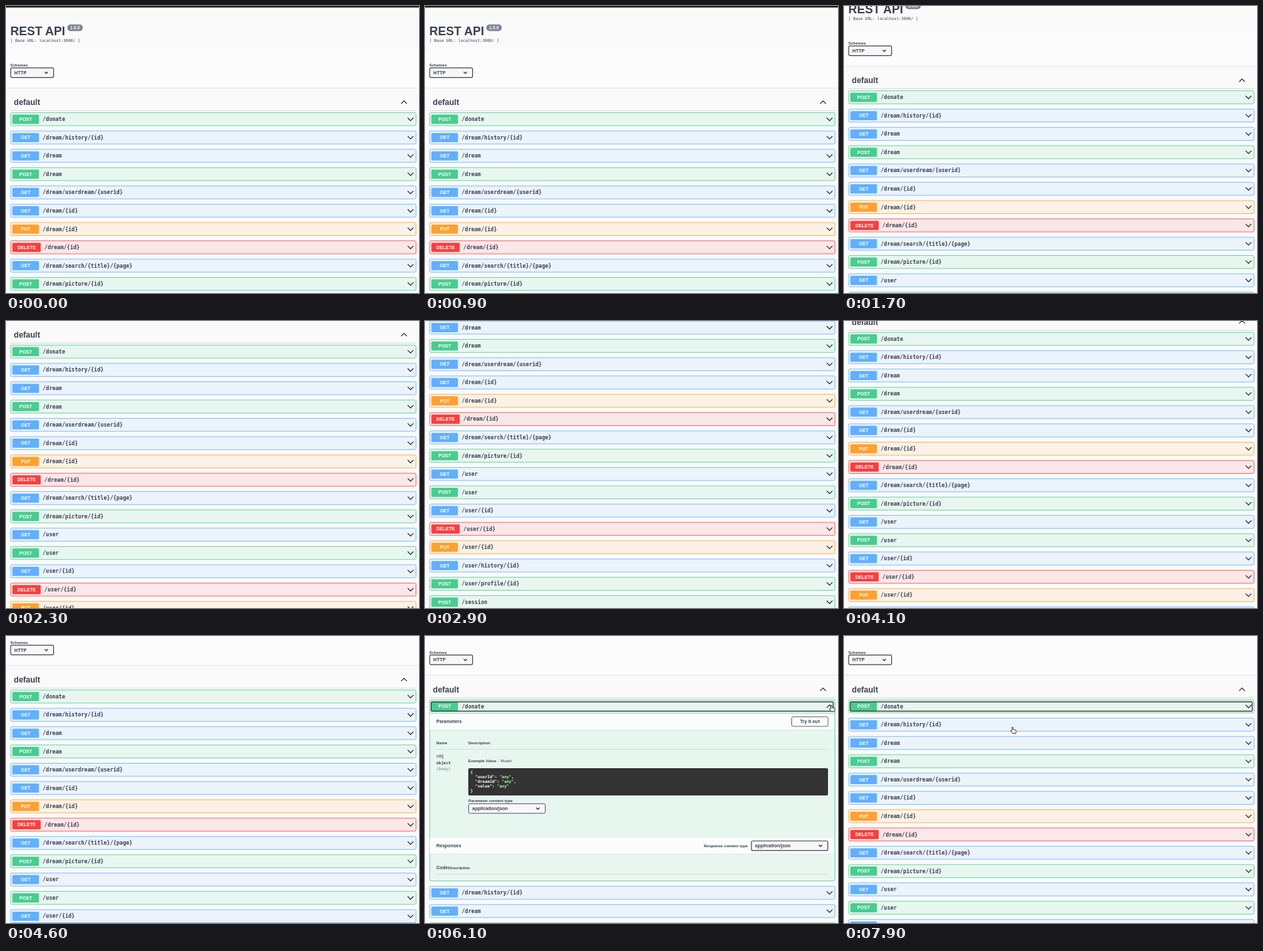
These frames come from a looping animation (620x432 px, 8000 ms). An HTML page:

```html
<!DOCTYPE html>
<html lang="en">
<head>
<meta charset="utf-8">
<title>REST API</title>
<style>
  html, body { margin: 0; width: 100%; height: 100%; overflow: hidden; background: #fafafa; }
  svg { display: block; width: 620px; height: 432px; }
  text { font: bold 7px "Liberation Sans", Arial, sans-serif; fill: #3b4151; white-space: pre; }
  .mono { font-family: "DejaVu Sans Mono", monospace; }
</style>
</head>
<body>
<svg id="stage" viewBox="0 0 620 432"></svg>
<script>
const COLORS = { POST: '#49cc90', GET: '#61affe', PUT: '#fca130', DELETE: '#f93e3e' };
const ROUTES = `POST /donate
GET /dream/history/{id}
GET /dream
POST /dream
GET /dream/userdream/{userid}
GET /dream/{id}
PUT /dream/{id}
DELETE /dream/{id}
GET /dream/search/{title}/{page}
POST /dream/picture/{id}
GET /user
POST /user
GET /user/{id}
DELETE /user/{id}
PUT /user/{id}
GET /user/history/{id}
POST /user/profile/{id}
POST /session`.split('\n').map(line => line.split(' '));
const PITCH = 27.55, FIRST_ROW = 160.6, PANEL_HEIGHT = 253;
const DARK = '#41444e';

const text = (x, y, content, size = 7, style = '', cls = '') =>
  `<text x="${x}" y="${y}" class="${cls}" style="font-size:${size}px;${style}">${content}</text>`;
const mono = (x, y, content, size = 6, style = '') => text(x, y, content, size, style, 'mono');
const rect = (x, y, w, h, fill, extra = '') =>
  `<rect x="${x}" y="${y}" width="${w}" height="${h}" fill="${fill}" ${extra}/>`;
const outline = (color, width = 1, radius = 2) => `stroke="${color}" stroke-width="${width}" rx="${radius}"`;
const rule = (y, x1 = 17, x2 = 605, color = 'rgba(59,65,81,.2)') =>
  rect(x1, y, x2 - x1, .6, color);
const chevron = (x, y, up, r = 4.3) => {
  const d = up ? -r / 2 : r / 2;
  return `<path d="M${x - r} ${y - d}L${x} ${y + d}L${x + r} ${y - d}" fill="none" stroke="#222" stroke-width="1.2"/>`;
};
const select = (x, y, w, label, color = DARK, width = 1.2) =>
  rect(x, y, w, 14.4, '#f7f7f7', outline(color, width)) +
  text(x + 5.6, y + 9.7, label) + chevron(x + w - 11, y + 7.2, false, 2.4);
const bar = y => rect(7, y + 24, 608, 1, 'rgba(0,0,0,.06)') + rect(7, y, 608, 24, 'rgba(255,255,255,.8)');

function header() {
  return rect(0, 0, 620, 2.3, '#1b1b1b') +
    text(6.5, 44.3, 'REST API', 18) +
    rect(92, 27.8, 23.3, 10, '#7d8492', 'rx="5"') +
    text(103.6, 35.2, '1.0.0', 6.5, 'fill:#fff;text-anchor:middle') +
    mono(6.5, 54, '[ Base URL: localhost:3000/ ]', 6, 'font-weight:normal') +
    rect(0, 71, 620, 52, '#fcfcfc') + rect(0, 123, 620, 1, '#e6e6e6') +
    text(6.5, 91.1, 'Schemes', 6) + select(7, 93.2, 64.5, 'HTTP') +
    text(11.8, 149.3, 'default', 12) + chevron(597.5, 145, true) +
    rule(157.2, 6.5, 616, 'rgba(59,65,81,.3)');
}

function row([method, path], index) {
  const y = FIRST_ROW + index * PITCH, color = COLORS[method];
  const width = method === 'DELETE' ? 42.6 : 40;
  const block = index ? rect(7, y, 608.5, 19.6, color, `fill-opacity=".1" ${outline(color, .8)}`) : '';
  return block + rect(9.5, y + 3, width, 13.8, color, 'rx="1.5"') +
    text(9.5 + width / 2, y + 12.3, method, 7, 'fill:#fff;text-anchor:middle') +
    mono(15 + width, y + 12.6, path, 8) +
    (index ? chevron(607.3, y + 9.8) : '');
}

function codeSample() {
  const fields = ['userId', 'dreamId', 'value'].map((name, i) => mono(68.3, 214.2 + 7 * i,
    `  "${name}": <tspan fill="#a2fca2">"any"</tspan>${i < 2 ? ',' : ''}`, 6, 'fill:#fff'));
  return rect(65, 199, 540, 41, '#333', 'rx="2"') +
    mono(68.3, 207.2, '{', 6, 'fill:#fff') + fields.join('') + mono(68.3, 235.2, '}', 6, 'fill:#fff');
}

// Laid out as seen with the page scrolled by 64.5
function panel() {
  return rule(115.8, 7, 615, COLORS.POST) + bar(117) + text(17, 131.2, 'Parameters') +
    rect(550.5, 121.7, 54.5, 14.3, 'none', outline('#666')) +
    text(577.7, 131.3, 'Try it out', 7, 'text-anchor:middle') +
    text(17, 162.8, 'Name', 6) + text(65, 162.8, 'Description', 6) + rule(170) +
    text(17, 183, 'obj', 8, 'font-weight:normal') +
    mono(17, 193, 'object') +
    mono(17, 202.4, '(body)', 6, 'font-weight:normal;font-style:italic;fill:#777') +
    text(65, 189.6, 'Example Value', 6) + rect(110.3, 184, .6, 7, 'rgba(0,0,0,.2)') +
    text(113.5, 189.6, 'Model', 6, 'font-weight:normal') + codeSample() +
    text(65, 249.7, 'Parameter content type', 6) + select(65.5, 252.5, 115, 'application/json', DARK, .9) +
    bar(304) + text(17, 318.3, 'Responses') +
    text(484.5, 317.8, 'Response content type', 6, 'text-anchor:end') +
    select(490, 308.5, 114.7, 'application/json') +
    text(17, 351, 'Code') + text(34.5, 350.7, 'Description', 6) + rule(358.2);
}

const stage = document.getElementById('stage');
stage.innerHTML = `<g id="page">${header()}
  ${rect(7, FIRST_ROW, 608.5, 19.6, COLORS.POST, `id="block" fill-opacity=".1" ${outline(COLORS.POST, .8)}`)}
  ${row(ROUTES[0], 0)}
  <g id="down">${chevron(607.3, 170.4)}</g><g id="up">${chevron(607.3, 170.4, true)}</g>
  <g id="panel" transform="translate(0 64.5)">${panel()}</g>
  <g id="focus">${rect(9.3, 163.6, 603.5, 14, 'none', outline('#222', 1.2, 1))}</g>
  <g id="rest">${ROUTES.slice(1).map((route, i) => row(route, i + 1)).join('')}</g></g>
  <path id="cursor" d="M-2 -4.5q1 -1 1.8 0v3.2l3.3 .6q1.4 .3 1.3 1.6l-.6 3.6h-5l-2.8 -3.5q.2 -1.2 2 0z"
    fill="#fff" stroke="#222" stroke-width=".9" stroke-linejoin="round"/>`;
const [page, block, down, up, panelGroup, focus, rest, cursor] =
  ['page', 'block', 'down', 'up', 'panel', 'focus', 'rest', 'cursor'].map(id => document.getElementById(id));

const SCROLL = [[0, 0], [1500, 0], [1700, 33], [2900, 215.6], [3500, 215.6], [4100, 143.5],
  [4600, 79.3], [4900, 64.5], [8000, 64.5]];
const OPEN = 5700, CLOSE = 7000;

function scrollAt(t) {
  const i = SCROLL.findIndex(([time]) => time > t);
  const [t0, y0] = SCROLL[i - 1], [t1, y1] = SCROLL[i];
  return y0 + (y1 - y0) * (t - t0) / (t1 - t0);
}
const show = (element, visible) => element.setAttribute('visibility', visible ? 'visible' : 'hidden');
const move = (element, x, y) => element.setAttribute('transform', `translate(${x} ${y})`);

function draw(now) {
  const t = Math.floor(now % 8000 / 100) * 100;
  const open = t >= OPEN && t < CLOSE;
  move(page, 0, -scrollAt(t));
  move(rest, 0, open ? PANEL_HEIGHT : 0);
  block.setAttribute('height', open ? 19.6 + PANEL_HEIGHT : 19.6);
  show(panelGroup, open);
  show(up, open);
  show(down, !open);
  show(focus, t >= OPEN);
  show(cursor, t >= 5400);
  const p = Math.min(1, Math.max(0, (t - 7200) / 500)), eased = p * p * (3 - 2 * p);
  move(cursor, 611 - 357 * eased, 109 + 33 * eased);
  requestAnimationFrame(draw);
}
requestAnimationFrame(draw);
</script>
</body>
</html>
```
